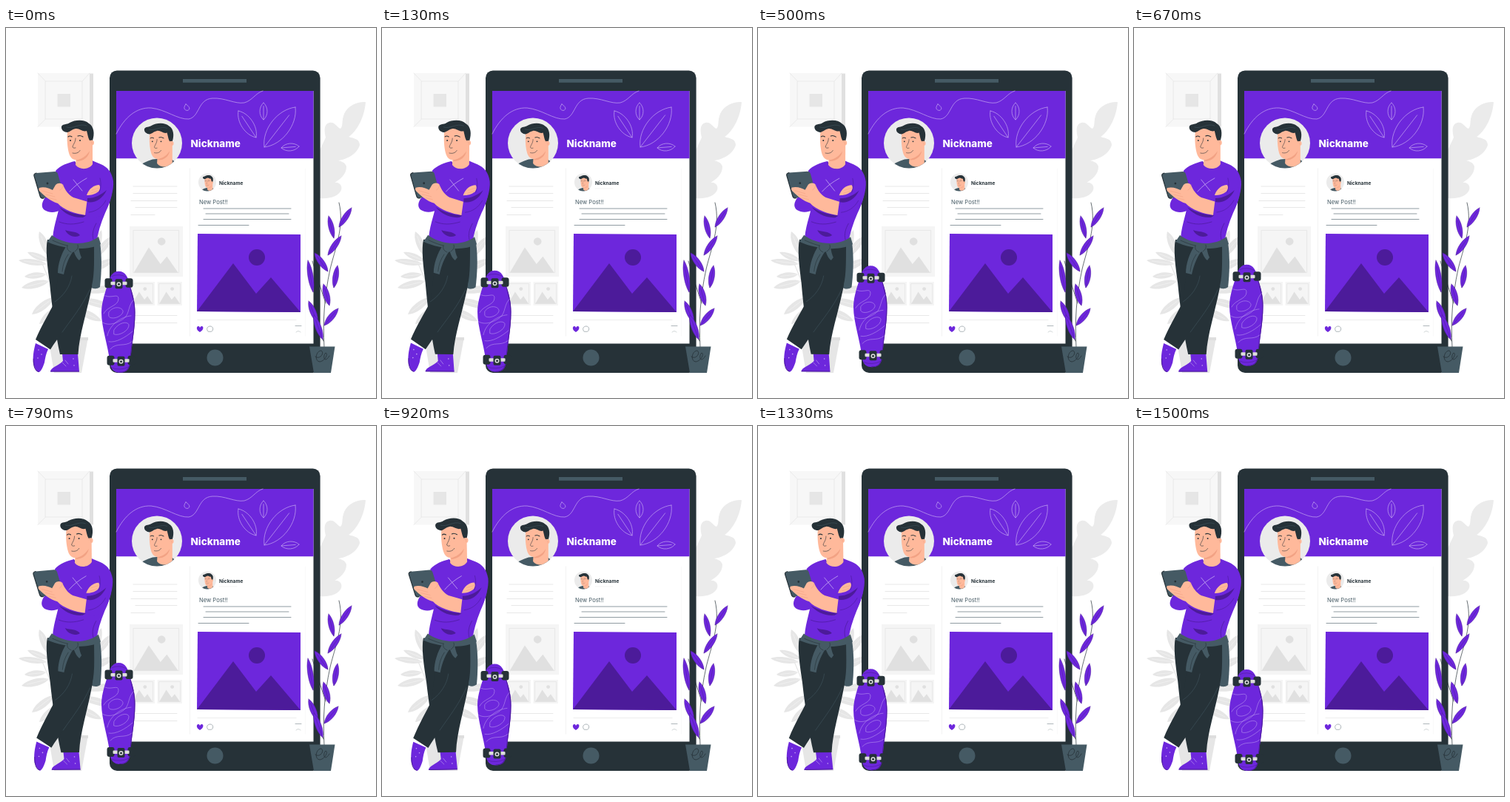
An HTML page with a canvas for the animation above (1.54 s loop, 500x500 px).

```html
<!DOCTYPE html>
<html lang="en">
<head>
<meta charset="utf-8">
<title>Profile page</title>
<style>
html, body { margin: 0; width: 100%; height: 100%; overflow: hidden; background: #fff; }
canvas { display: block; width: 100vw; height: 100vh; }
</style>
</head>
<body>
<canvas id="stage" width="500" height="500"></canvas>
<script>
const ctx = document.getElementById('stage').getContext('2d');
const LOOP = 1540, LEAD = 60;
const PURPLE = '#6d27dc', DEEP = '#4c1b9a', INK = '#263238', SLATE = '#455a64';
const SKIN = '#ffb99b', BLUSH = '#f2a284', LILAC = '#c5a8f1';
const paths = new Map();

function pathOf(d) {
  if (!paths.has(d)) paths.set(d, new Path2D(d));
  return paths.get(d);
}
function fill(color, d) {
  ctx.fillStyle = color;
  ctx.fill(pathOf(d));
}
function line(color, width, d) {
  ctx.strokeStyle = color;
  ctx.lineWidth = width;
  ctx.stroke(pathOf(d));
}
function rect(color, x0, y0, x1, y1, r = 0) {
  ctx.fillStyle = color;
  ctx.beginPath();
  ctx.roundRect(x0, y0, x1 - x0, y1 - y0, r);
  ctx.fill();
}
function disc(color, x, y, r) {
  ctx.fillStyle = color;
  ctx.beginPath();
  ctx.arc(x, y, r, 0, Math.PI * 2);
  ctx.fill();
}
function text(str, x, y, font, color) {
  ctx.font = font + ' Inter, "Open Sans", sans-serif';
  ctx.fillStyle = color;
  ctx.fillText(str, x, y);
}
function placed(x, y, scale, draw) {
  ctx.save();
  ctx.translate(x, y);
  ctx.scale(scale, scale);
  draw();
  ctx.restore();
}
// Leaf from tip to base with a given half width.
function leaf([x0, y0, x1, y1, w], { body, edge, rib, weight = 0.7 }) {
  const len = Math.hypot(x1 - x0, y1 - y0);
  const nx = (y0 - y1) / len * w * 1.33, ny = (x1 - x0) / len * w * 1.33;
  const ax = x0 * 0.75 + x1 * 0.25, ay = y0 * 0.75 + y1 * 0.25;
  const bx = x0 * 0.25 + x1 * 0.75, by = y0 * 0.25 + y1 * 0.75;
  ctx.beginPath();
  ctx.moveTo(x0, y0);
  ctx.bezierCurveTo(ax + nx, ay + ny, bx + nx, by + ny, x1, y1);
  ctx.bezierCurveTo(bx - nx, by - ny, ax - nx, ay - ny, x0, y0);
  if (body) { ctx.fillStyle = body; ctx.fill(); }
  ctx.lineWidth = weight;
  if (edge) { ctx.strokeStyle = edge; ctx.stroke(); }
  if (rib) {
    ctx.strokeStyle = rib;
    ctx.beginPath();
    ctx.moveTo(x0 * 0.8 + x1 * 0.2, y0 * 0.8 + y1 * 0.2);
    ctx.lineTo(x1, y1);
    ctx.stroke();
  }
}

function wallFrame() {
  rect('#e0e0e0', 112, 61.5, 118, 133.5);
  rect('#f7f7f7', 43, 61, 113, 133.5);
  line('#e6e6e6', 0.8, 'M53.5 72H103V123H53.5Z M43 61L53.5 72 M113 61L103 72 M43 133.5L53.5 123 M113 133.5L103 123');
  rect('#e6e6e6', 69.5, 89, 87, 106.5);
}

function greyPlants() {
  fill('#ebebeb', 'M486 100C476 99 462 104 457 116C453 126 456 132 452 136C447 134 444 126 437 128C429 130 430 140 432 148L424 165V230C437 231 449 228 453 219C455 213 450 208 444 209C452 204 460 198 460 187C458 181 452 180 449 179C460 178 475 170 478 158C478 149 468 149 463 147C471 142 484 125 486 100Z');
  line('#e6e6e6', 1.2, 'M83 420C78 385 60 345 48 316 M86 420C96 380 118 330 132 290');
  const style = { body: '#e6e6e6', rib: '#f2f2f2' };
  const foliage = [
    [17, 314, 55, 319, 4], [29, 303, 58, 315, 4], [45, 275, 58, 308, 5],
    [21, 351, 58, 342, 5], [25, 336, 54, 333, 4], [35, 387, 65, 364, 5],
    [45, 400, 72, 376, 5], [129, 273, 116, 314, 5], [144, 281, 118, 312, 5],
    [147, 312, 110, 329, 5], [148, 351, 106, 356, 5], [145, 378, 100, 366, 5],
    [129, 396, 96, 380, 5]
  ];
  foliage.forEach(l => leaf(l, style));
  fill('#e6e6e6', 'M57 418H111L102 466H65Z');
  rect('#dedede', 57, 418, 111, 422);
}

function head() {
  fill(SKIN, 'M95 166L117 157V184C112 192 99 192 94 185Z');
  fill(BLUSH, 'M95 178C104 177 110 171 113 166C112 174 105 180 96 180Z');
  fill(SKIN, 'M83 139C82 152 83 161 85 169C87 176 91 179 97 178C105 176 111 170 114 162L117 158V137L90 133Z');
  fill(INK, 'M83 141C79 141 74 138 75 133C77 129 82 131 86 128C93 124 106 123 112 129C119 133 120 143 117 152L114 153C111 150 111 146 109 139C104 141 99 135 94 136C89 137 87 140 83 141Z');
  line(SLATE, 0.5, 'M82 134C91 137 99 128 109 132');
  disc(SKIN, 115.5, 155, 3.5);
  line(BLUSH, 0.6, 'M114 153Q117 153 116 157');
  line(INK, 1.1, 'M84 147Q86 145 89 147 M97 146Q100 144.5 104 147');
  disc(INK, 87, 152, 1);
  disc(INK, 100, 152, 1);
  line(INK, 0.6, 'M94 149C94 155 90 158 90 161Q91 163 94 162 M90 169C94 170 98 169 100 165.5');
}

function avatar() {
  ctx.save();
  ctx.beginPath();
  ctx.arc(0, 0, 34, 0, Math.PI * 2);
  ctx.fillStyle = '#ebebeb';
  ctx.fill();
  ctx.clip();
  fill(SLATE, 'M-30 36C-22 27 -14 25 -6 22L16 20C22 23 28 27 32 36Z');
  placed(-84.5, -139, 0.9, head);
  ctx.restore();
}

function photo(x0, y0, x1, y1) {
  const w = x1 - x0, h = y1 - y0;
  const inset = w * 0.075;
  rect('#f5f5f5', x0, y0, x1, y1);
  ctx.strokeStyle = '#e0e0e0';
  ctx.lineWidth = 0.6;
  ctx.strokeRect(x0 + inset, y0 + inset, w - inset * 2, h - inset * 2);
  const ridge = [[0.08, 0.92], [0.36, 0.42], [0.58, 0.75], [0.7, 0.6], [0.91, 0.92]];
  ctx.fillStyle = '#e0e0e0';
  ctx.beginPath();
  ridge.forEach(([u, v]) => ctx.lineTo(x0 + u * w, y0 + v * h));
  ctx.fill();
  disc('#e0e0e0', x0 + w * 0.6, y0 + h * 0.3, w * 0.073);
}

function header() {
  rect(PURPLE, 149, 85, 415.5, 176.3);
  line(LILAC, 0.7, 'M149 143C160 121 176 107 196 108C216 110 232 124 247 123C262 120 259 96 279 95C296 94 309 103 322 101C333 98 337 88 347 85');
  line(LILAC, 0.7, 'M243 103C239 108 241 111 245 111.5C250 110 248 106 243 103Z');
  const style = { edge: LILAC, rib: LILAC };
  [[314, 112, 338, 148, 8], [348, 101, 348, 124, 5], [391, 107, 349, 161, 13], [396, 160, 372, 162, 5]]
    .forEach(l => leaf(l, style));
  placed(204, 155.5, 1, avatar);
  text('Nickname', 249.5, 161, '800 13.5px', '#fff');
}

function tablet() {
  rect(INK, 140, 57.4, 424.6, 466, 10);
  rect('#fff', 149, 85, 415.5, 426.5);
  rect(SLATE, 239, 69, 325, 73.7);
  disc(SLATE, 282.5, 445.5, 11);
  header();

  line('#dedede', 0.7, 'M172 214H231 M172 223.5H231 M169 233.5H231 M175 242.5H231 M169 252.5H201 M174 388.5H231 M174 398.5H231');
  photo(167, 268, 239, 336);
  photo(168, 343, 201, 375);
  photo(204.5, 343, 238, 375);
  line('#f0f0f0', 0.8, 'M248.5 190V416');
  line('#f8f8f8', 0.8, 'M404.5 190V416');

  placed(272, 208.5, 0.353, avatar);
  text('Nickname', 288, 212.3, '700 6.6px', INK);
  line('#ededed', 0.6, 'M288 217H312');
  text('New Post!!', 261, 238, '400 7.6px', SLATE);
  line(SLATE, 0.6, 'M267 244H385 M270 251H382 M267 258.5H385 M260 266.5H328');
  fill(PURPLE, 'M259 278L398 279V384L258 383Z');
  fill(DEEP, 'M258 383L307 318L338 359L358 337L398 384Z');
  disc(DEEP, 339, 310, 11);
  line('#e6e6e6', 0.7, 'M259 394.5H392');
  fill(PURPLE, 'M262 411C257 408 257 404 259.5 403Q261.5 402.5 262 405Q263 402.5 265 403C267.5 404 267 408 262 411Z');
  line('#78858b', 0.6, 'M273 410C270 407 272 403 276 403C280 403 281 408 278 410Z M391 402.5H399');
  line('#b0b8bb', 0.6, 'M392 411Q395 408 398 411');
}

function pottedPlant() {
  line(INK, 0.7, 'M430 432C428 395 430 363 438 326C444 300 458 268 450 236 M432 372C423 345 417 325 414 315 M429 423L416 393');
  const style = { body: PURPLE, edge: DEEP, rib: DEEP, weight: 0.5 };
  const foliage = [
    [467, 243, 450, 269, 3.8], [436, 254, 443, 284, 3.6], [453, 281, 435, 307, 3.8],
    [417, 304, 435, 329, 4], [448, 321, 443, 351, 3.8], [408, 314, 415, 357, 3.6],
    [429, 346, 437, 375, 4], [409, 369, 421, 398, 4], [449, 379, 430, 402, 4],
    [416, 388, 428, 421, 4]
  ];
  foliage.forEach(l => leaf(l, style));
  fill(SLATE, 'M410 430.5H444.5L439 466H416Z');
  line(INK, 0.8, 'M418 444C424 449 431 439 426 436C419 436 416 450 424 451C431 450 436 440 432 439C427 444 431 454 437 443');
}

function legs() {
  fill(SLATE, 'M108 288L127 290C130 310 129 332 127 350C123 353 118 353 114 350Z');
  fill(PURPLE, 'M76 440H97L99 464.5H60C60 459 70 457 77 450Z');
  line(DEEP, 1, 'M60.5 464H98.5');
  line(LILAC, 0.6, 'M76 452L81 457 M80 449L84 454');
  fill(PURPLE, 'M40 426L57 434C54 440 53 446 52 452C50 458 48 463 45 465C41 465 39 459 37 454C36 445 37 437 40 426Z');
  line(DEEP, 1, 'M37.3 447C37 456 39 463 44 464.5');
  for (const [x, y] of [[44, 435], [48, 441], [43, 446], [91, 447], [92, 456]]) disc(LILAC, x, y, 0.8);
  fill(INK, 'M56 286C53 300 56 322 59 344C62 376 67 414 73 441H97.5C99 414 109 386 116 350L118 290Z');
  fill(INK, 'M75 296L119 292C119 318 120 339 114 354C102 379 82 401 60 434.5L40 421C48 402 58 386 66 370Z');
  line(SLATE, 0.5, 'M113 354C103 376 88 394 76 411 M66 370C78 362 87 349 89 335');
}

function torso() {
  fill(PURPLE, 'M93 180C84 182 73 186 67 193L73 232C72 250 65 262 63 284C84 292 108 296 122 291C124 277 128 264 134 250C141 236 146 218 145 207C143 194 137 188 128 184L116 179C112 191 99 192 93 180Z');
  line(DEEP, 0.6, 'M93 181C99 194 114 192 117 180 M127 203C129 211 128 217 126 222');
  line(LILAC, 0.8, 'M91 205L103 220 M109 203C100 208 92 214 86 221');
  fill(DEEP, 'M80 273C87 276 95 274 100 280C95 284 84 282 80 273Z');
  line(DEEP, 0.7, 'M72 262C82 266 92 266 105 262 M118 286C116 278 118 271 122 264');
}

function waistTie() {
  fill(SLATE, 'M62 280C76 291 106 297 125 282L128 292C112 301 80 300 56 289Z');
  fill(SLATE, 'M82 294C75 304 70 319 70 331L78 333C81 319 86 307 94 298Z M90 295C92 304 94 310 99 314L102 310C99 304 99 298 97 294Z');
  fill(SLATE, 'M82 293C88 291 96 292 98 296C96 303 88 305 83 300Z');
  line(INK, 0.6, 'M83 294Q81 300 88 303 M97 293Q99 298 93 302 M84 306Q77 316 76 329 M63 287C72 291 78 293 83 294');
}

function arms() {
  fill(PURPLE, 'M53 229C48 236 47 242 52 246C59 250 66 250 76 245L73 229Z');
  fill(DEEP, 'M72 242C82 249 97 253 109 253L104 256C91 257 79 251 72 242Z');
  fill(SKIN, 'M109 226C112 217 119 212 126 212C128 215 127 218 125 221C120 225 115 226 109 226Z');
  line(BLUSH, 0.6, 'M116 219L126 216 M115 223L124 220');
  fill(SLATE, 'M41 196L66 194Q69 194 70 197L76 218Q77 222 73 224L51 230Q47 231 46 227L38 200Q37 197 41 196Z');
  line(INK, 1.2, 'M51 230Q47 231 46 227L38 200Q37 197 41 196');
  disc(INK, 56, 210, 1.4);
  fill(SKIN, 'M45 216C52 214 59 217 63 219L67 212C70 209 75 209 77 212C80 219 84 225 91 229L111 235L108 253C94 251 78 246 70 237C60 234 52 227 47 222Q43 219 45 216Z');
  line(BLUSH, 0.6, 'M49 220L63 224 M54 225L66 228 M59 230L68 232 M77 212Q77 217 73 219');
  fill(PURPLE, 'M110 230C120 231 128 225 134 216L144 215C143 231 137 247 128 254C121 257 113 256 107 253Z');
  fill(DEEP, 'M110 230C121 230 129 225 136 219C130 232 119 237 110 235Z');
  line(DEEP, 0.6, 'M112 249C122 248 130 242 135 233');
}

function man(swing) {
  ctx.save();
  ctx.translate(90, 295);
  ctx.rotate(swing);
  ctx.translate(-90, -295);
  legs();
  torso();
  waistTie();
  head();
  arms();
  ctx.restore();
}

function truck(x, y) {
  rect(INK, x - 19, y - 7, x - 9, y + 6, 3);
  rect(INK, x + 9, y - 7, x + 19, y + 5.5, 3);
  rect('#dedede', x - 11, y - 2.5, x + 11, y + 2, 1);
  rect(INK, x - 5, y - 6, x + 5, y + 7, 2);
  disc('#e0e0e0', x, y + 1, 3);
  disc(INK, x, y + 1, 1.5);
}

function skateboard(lift) {
  const deck = 'M152 329C162 329 165 337 168 350C172 362 174.5 372 174.5 385C174.5 410 169 430 168.5 450C167 463 162 466 154 466C146 466 141 462 140 450C138 430 129 405 129 385C129 370 135 355 138 345C141 334 145 329 152 329Z';
  ctx.save();
  ctx.translate(0, lift);
  fill(PURPLE, deck);
  ctx.save();
  ctx.clip(pathOf(deck));
  line(DEEP, 2, 'M167 346C172 362 174.5 372 174.5 385C174.5 410 169 430 168.5 450C167 463 162 466 154 466');
  line(LILAC, 0.5, 'M134 362C142 366 152 358 152 366C152 376 137 376 132 386 M139 384C146 374 159 378 158 384C156 391 142 395 139 390Z M129 397C138 404 150 399 159 393C168 386 164 374 174 366 M146 408C152 398 164 396 166 401C167 409 152 417 146 414Z M137 416C140 400 157 390 169 389 M139 424C148 426 162 418 171 410 M141 434C150 424 160 432 170 424');
  line(DEEP, 0.6, 'M142 336Q153 331 163 337 M142 459Q154 464 166 458');
  ctx.restore();
  truck(152.5, 345.5);
  truck(155.5, 450);
  ctx.restore();
}

const swingAt = t => Math.sin((t + LEAD) / LOOP * Math.PI * 2);
const liftAt = t => -4.6 * (1 - Math.cos((t + LEAD) / LOOP * Math.PI * 2));

function render(t) {
  ctx.fillStyle = '#fff';
  ctx.fillRect(0, 0, 500, 500);
  wallFrame();
  greyPlants();
  tablet();
  pottedPlant();
  man((swingAt(t) - swingAt(0)) * Math.PI / 180);
  skateboard(liftAt(t));
}

ctx.lineCap = ctx.lineJoin = 'round';
const start = performance.now();
function tick() {
  render((performance.now() - start) % LOOP);
  requestAnimationFrame(tick);
}
tick();
</script>
</body>
</html>
```
